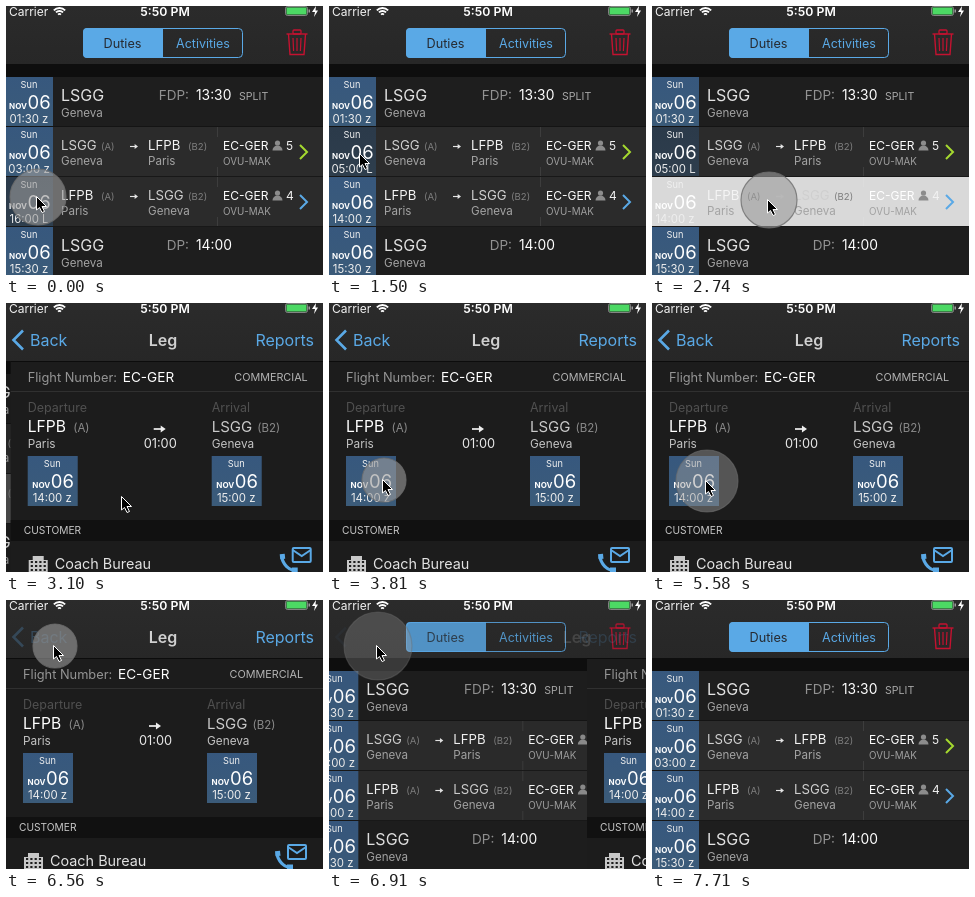
Recreate the animation shown at these times as an HTML page with a canvas. Size 317 by 269 pixels, loop 8280 ms.

```html
<!DOCTYPE html>
<html lang="en">
<head>
<meta charset="utf-8">
<title>Duty list</title>
<style>
html, body { margin: 0; width: 100%; height: 100%; overflow: hidden; background: #111; }
canvas { display: block; width: 317px; height: 269px; }
</style>
</head>
<body>
<canvas id="stage"></canvas>
<script>
const W = 317, H = 269, LOOP = 8280, TICK = 88.7, LEAD = 74;
const BLUE = '#5aa9e6', LIME = '#a5d92f', RED = '#c41230', CITY = '#a4a4a4', NOTE = '#7e7e7e';
const ZULU = ['#37587e', '#3b5b79'], LOCAL = ['#2b3a4a', '#2e3e4d'];
const canvas = document.getElementById('stage');
const ratio = window.devicePixelRatio || 1;
canvas.width = W * ratio;
canvas.height = H * ratio;
const c = canvas.getContext('2d');

// All timing below is in ticks
const press = { row3: -3, row2: 9, open: 28, local: 42, zulu: 59, back: 73 };
const HELD = 2, FLIP = 3, FADE = 4, EXIT = 86;
const home = { x: 30, y: 190 };
const moves = [
  { from: 2, to: 5, x: 30, y: 147 },
  { from: 20, to: 26, x: 115, y: 193 },
  { from: 37, to: 42, x: 53, y: 176 },
  { from: 46, to: 50, x: 64, y: 174 },
  { from: 51, to: 54, x: 53, y: 177 },
  { from: 62, to: 68, x: 47, y: 45 },
  { from: 77, to: 82, x: 221, y: 188 },
  { from: 83, to: 85, x: 276, y: 247 }
];

const clamp = v => Math.max(0, Math.min(1, v));
const smooth = v => v * v * (3 - 2 * v);
const spring = k => k <= 0 ? 0 : k > 7 ? 1 : 1 - (1 + k * 1.545) * Math.exp(-k * 1.545);
const flipped = (k, on, off) => k >= on + FLIP && k < off;

function pointerAt(k) {
  let { x, y } = home;
  for (const m of moves) {
    const v = smooth(clamp((k - m.from) / (m.to - m.from)));
    x += (m.x - x) * v;
    y += (m.y - y) * v;
  }
  return { x, y };
}

function rect(x, y, w, h, fill) {
  c.fillStyle = fill;
  c.fillRect(x, y, w, h);
}

function shade(x, y, w, h, [top, bottom]) {
  const g = c.createLinearGradient(0, y, 0, y + h);
  g.addColorStop(0, top);
  g.addColorStop(1, bottom);
  rect(x, y, w, h, g);
}

function text(s, x, y, size, color, align = 'left', weight = 400) {
  c.font = `${weight} ${size}px Inter, Roboto, "Liberation Sans", sans-serif`;
  c.textAlign = align;
  c.fillStyle = color;
  c.fillText(s, x, y);
}

function trace(points) {
  c.beginPath();
  for (const [x, y] of points) c.lineTo(x, y);
}

function fill(color) {
  c.fillStyle = color;
  c.fill();
}

function stroke(color, width) {
  c.strokeStyle = color;
  c.lineWidth = width;
  c.stroke();
}

function line(points, color, width) {
  trace(points);
  stroke(color, width);
}

function arc(x, y, r, from = 0, to = 7) {
  c.beginPath();
  c.arc(x, y, r, from, to);
}

function box(x, y, w, h, r) {
  c.beginPath();
  c.roundRect(x, y, w, h, r);
}

function layer(x, alpha, draw) {
  if (alpha <= 0) return;
  c.save();
  c.translate(x, 0);
  c.globalAlpha *= alpha;
  draw();
  c.restore();
}

function chevron(x, y, w, h, color, width) {
  line([[x, y - h], [x + w, y], [x, y + h]], color, width);
}

function arrow(x, y, w, color) {
  line([[x, y], [x + w - 2, y]], color, w / 7);
  trace([[x + w * 0.58, y - w * 0.3], [x + w, y], [x + w * 0.58, y + w * 0.3]]);
  fill(color);
}

function dateCell(x, y, w, h, time, colors, alpha = 1) {
  const mid = x + w / 2 - 0.5;
  layer(0, alpha, () => shade(x, y, w, h, colors));
  text('Sun', mid, y + 11, 9.2, '#f0f0f0', 'center');
  text('NOV', mid - 2, y + 31.5, 8, '#fff', 'right', 700);
  text('06', mid - 1.5, y + 32, 18.5, '#fff');
  text(time, mid, y + 45.5, 11.4, '#eee', 'center');
}

function dutyRow(y, time, label, value, note) {
  rect(0, y, W, 50, '#1e1e1e');
  dateCell(0, y, 47, 49, time, ZULU);
  text('LSGG', 55, y + 24, 16, '#e2e2e2');
  text('Geneva', 55, y + 40, 11.6, CITY);
  text(label, 183, y + 23, 13.5, '#929292', 'right');
  text(value, 190, y + 23, 13.8, '#fff');
  text(note, 233, y + 23, 10.6, '#a8a8a8');
  rect(0, y + 49, W, 1, '#141414');
}

function place(x, y, code, mark) {
  const paris = code === 'LFPB';
  text(code, x, y + 23, 13.2, paris ? '#f4f4f4' : '#cfcfcf');
  text(mark, x + 40, y + 22.5, 9.6, NOTE);
  text(paris ? 'Paris' : 'Geneva', x, y + 38, 11.6, CITY);
}

function legRow(y, time, colors, from, to, crew, tint, glow) {
  rect(0, y, W, 50, '#2b2b2b');
  rect(211, y, 1, 10, '#3d3d3d');
  rect(211, y + 40, 1, 9, '#3d3d3d');
  rect(0, y, W, 50, `rgba(255,255,255,${0.82 * glow})`);
  dateCell(0, y, 47, 49, time, colors, 1 - glow);
  place(55, y, from, '(A)');
  arrow(124, y + 19.5, 8, '#e4e4e4');
  place(142, y, to, '(B2)');
  text('EC-GER', 217, y + 23, 12, '#fff');
  arc(271.5, y + 16, 2.6);
  fill('#8c8c8c');
  arc(271.5, y + 23.5, 5, Math.PI, 0);
  fill('#8c8c8c');
  text(crew, 280, y + 23, 12, '#f2f2f2');
  text('OVU-MAK', 217, y + 38, 9.8, '#a0a0a0');
  chevron(294, y + 25, 7, 7, tint, 2);
  rect(0, y + 49, W, 1, '#181818');
}

function listPage(k) {
  const second = flipped(k, press.row2, press.back), third = k < press.row3 + FLIP;
  const glow = k < press.open ? 0 : clamp(k - press.open) * (1 - clamp((k - press.open - HELD) / 5));
  rect(0, 58, W, H, '#0e0e0e');
  dutyRow(71, '01:30 z', 'FDP:', '13:30', 'SPLIT');
  legRow(121, second ? '05:00 L' : '03:00 z', second ? LOCAL : ZULU, 'LSGG', 'LFPB', '5', LIME, 0);
  legRow(171, third ? '16:00 L' : '14:00 z', third ? LOCAL : ZULU, 'LFPB', 'LSGG', '4', BLUE, glow);
  dutyRow(221, '15:30 z', 'DP:', '14:00', '');
}

function building(x, y) {
  rect(x + 4, y, 11, 17, '#c8c8c8');
  rect(x, y + 4, 19, 13, '#c8c8c8');
  for (let i = 0; i < 4; i++)
    for (let j = 0; j < 3; j++) rect(x + 2 + i * 4.3, y + 5 + j * 4, 2.2, 2, '#1e1e1e');
}

function contactIcon(x, y) {
  box(x + 13, y, 18, 14, 1);
  stroke(BLUE, 2);
  line([[x + 13, y + 2], [x + 22, y + 8], [x + 31, y + 2]], BLUE, 2);
  arc(x + 18, y + 7, 16, 1.65, 3.05);
  stroke(BLUE, 3.2);
  line([[x + 2.5, y + 6], [x + 3, y + 11]], BLUE, 5);
  line([[x + 12, y + 22], [x + 18, y + 22]], BLUE, 5);
}

function airport(x, heading, code, mark, city, time, colors, size, color) {
  text(heading, x, 109, 12.5, '#505050');
  text(code, x, 129, size, color);
  text(mark, x + 45.5, 129, 11.5, '#8a8a8a');
  text(city, x, 145, 11.8, '#c4c4c4');
  dateCell(x, 153, 50, 50, time, colors);
}

function legPage(k) {
  const local = flipped(k, press.local, press.zulu + FLIP), colors = local ? LOCAL : ZULU;
  rect(0, 58, W, H, '#1c1c1c');
  rect(0, 58, W, 1, '#0c0c0c');
  text('Flight Number:', 17, 79, 12.8, '#959595');
  text('EC-GER', 112, 79, 13.6, '#fff');
  text('COMMERCIAL', 297, 77.5, 10.8, '#b4b4b4', 'right');
  rect(0, 88, W, 1, '#303030');
  airport(17, 'Departure', 'LFPB', '(A)', 'Paris', local ? '16:00 L' : '14:00 z', colors, 15.6, '#fff');
  airport(201, 'Arrival', 'LSGG', '(B2)', 'Geneva', local ? '17:00 L' : '15:00 z', colors, 15, '#cacaca');
  arrow(143, 126, 12, '#eee');
  text('01:00', 149.5, 145, 12.8, '#e8e8e8', 'center');
  rect(0, 217, W, 21, '#111');
  text('CUSTOMER', 13, 231, 10.2, '#c8c8c8');
  building(18, 253);
  text('Coach Bureau', 44, 266, 14.4, '#e2e2e2');
  contactIcon(269, 245);
}

function trash(x, y) {
  line([[x - 10.5, y], [x + 10.5, y]], RED, 1.4);
  box(x - 4, y - 4, 8, 4, 1);
  stroke(RED, 1.3);
  line([[x - 8.5, y], [x - 7, y + 20.5], [x + 7, y + 20.5], [x + 8.5, y]], RED, 1.4);
  for (const i of [-1, 0, 1]) line([[x + i * 4, y + 4], [x + i * 3.4, y + 17]], RED, 1.2);
}

function listBar() {
  box(77.5, 22.5, 159, 29, 4);
  stroke(BLUE, 1);
  box(77, 22, 80, 30, [4, 0, 0, 4]);
  fill(BLUE);
  text('Duties', 116.5, 42, 12.7, '#262a30', 'center');
  text('Activities', 197, 42, 12.5, BLUE, 'center');
  trash(291, 28);
}

function legBar(p, pressed) {
  layer(0, pressed ? 0.25 : 1, () => {
    chevron(17, 37, -9.5, 9.5, BLUE, 2.6);
    text('Back', 24 + 60 * (1 - p), 43, 16, BLUE);
  });
  text('Leg', 157 + 110 * (1 - p), 43, 16, '#d0d0d0', 'center', 600);
  text('Reports', 308, 43, 16, BLUE, 'right');
}

function statusBar() {
  text('Carrier', 3, 10, 12, '#f2f2f2');
  for (let r = 2; r < 9; r += 3) {
    arc(53.5, 10, r, -2.36, -0.78);
    stroke('#fff', 1.8);
  }
  text('5:50 PM', 159, 10, 12.3, '#fff', 'center', 600);
  box(279.5, 0.5, 22, 9, 2);
  stroke('#9a9a9a', 0.8);
  rect(280.5, 1.5, 20, 7, '#4cd964');
  rect(302.5, 3.5, 1.5, 3, '#9a9a9a');
  trace([[310, 0], [306, 6], [309, 6], [308, 11], [312, 4.5], [309.5, 4.5]]);
  fill('#fff');
}

function drawTap(k, down) {
  const age = k - down, out = clamp((age - HELD) / FADE);
  if (age < 0 || out >= 1) return;
  const { x, y } = pointerAt(down);
  const r = 22 + 6 * clamp(age / HELD) + 12 * out;
  layer(0, 1 - out, () => {
    arc(x + 2, y + 1, r);
    fill('rgba(155,155,155,.6)');
    stroke('rgba(110,110,110,.8)', 1.2);
  });
}

function drawPointer(k) {
  if (k >= EXIT) return;
  const { x, y } = pointerAt(k);
  c.save();
  c.translate(x + 0.5, y + 0.5);
  trace([[0, 0], [0, 13.5], [3, 11], [5.5, 16], [8, 15], [5.5, 10], [10, 10]]);
  c.closePath();
  fill('#000');
  stroke('#fff', 1);
  c.restore();
}

function render(k) {
  const p = spring(k - press.open - HELD) - spring(k - press.back - HELD);
  const bar = clamp(p * 1.04 - 0.02);
  c.setTransform(ratio, 0, 0, ratio, 0, 0);
  layer(-95 * p, 1, () => listPage(k));
  rect(0, 58, W, H, `rgba(0,0,0,${0.1 * p})`);
  if (p > 0) layer(W * (1 - p), 1, () => legPage(k));
  shade(0, 0, W, 58, ['#2b2b2b', '#272727']);
  statusBar();
  layer(0, 1 - bar, listBar);
  layer(0, bar, () => legBar(bar, k >= press.back));
  for (const down of Object.values(press)) drawTap(k, down);
  drawPointer(k);
}

const begin = performance.now();
function frame() {
  const ms = (performance.now() - begin) % LOOP;
  render(Math.floor((ms - LEAD) / TICK));
  requestAnimationFrame(frame);
}
frame();
</script>
</body>
</html>
```
